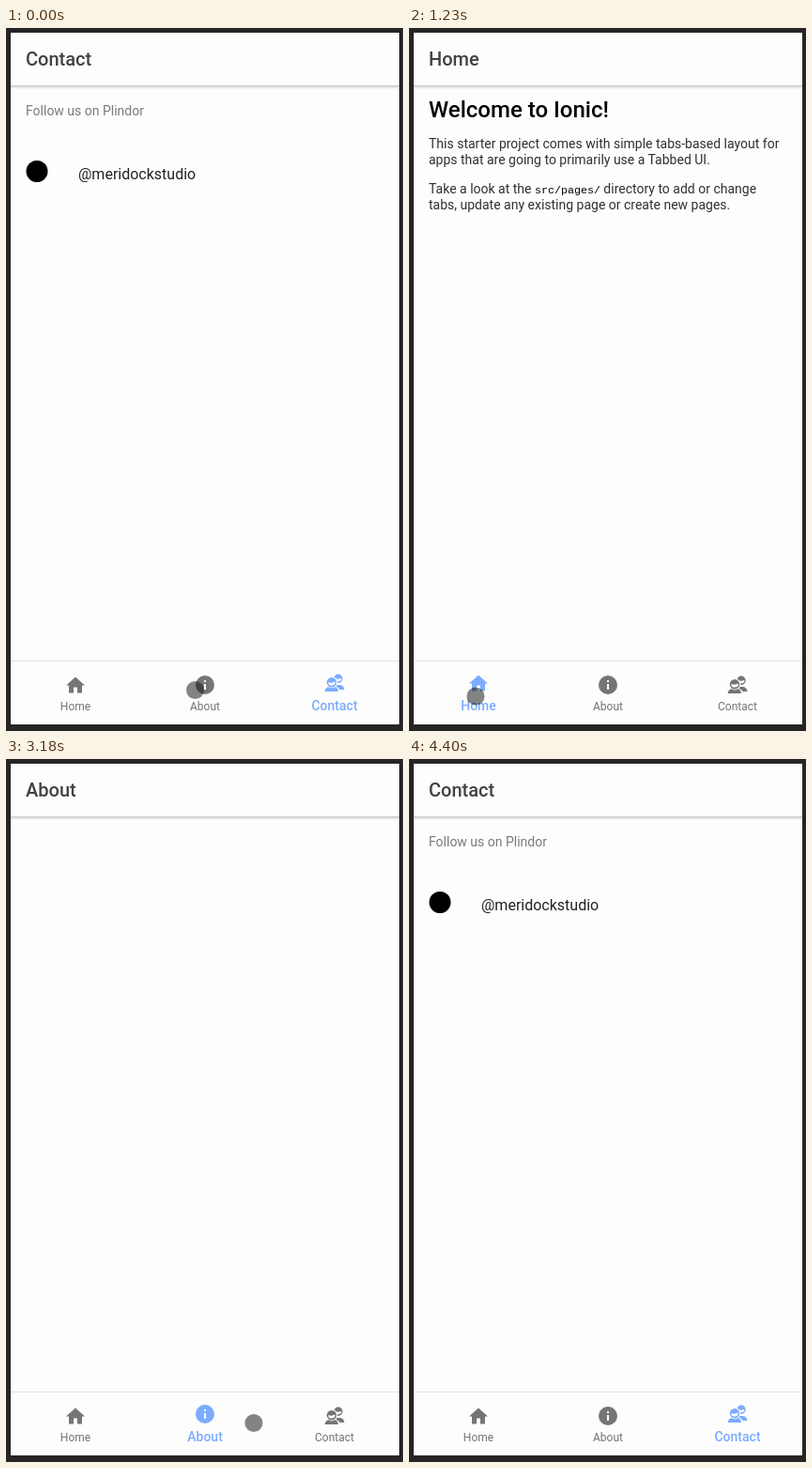
Write an HTML page that moves like this. It is 423 by 748 pixels and loops after 5230 ms.

```html
<!DOCTYPE html>
<html lang="en">
<head>
<meta charset="utf-8">
<title>Tabs starter</title>
<style>
html, body { margin: 0; width: 100%; height: 100%; overflow: hidden; background: #262425; }
svg { display: block; font-family: Roboto, sans-serif; font-size: 14px; }
.title { font-size: 20px; font-weight: 500; fill: #424242; }
.body { fill: #303030; }
.code { font: 11.67px "Liberation Mono", monospace; fill: #000; }
.tab { fill: #757575; text-anchor: middle; font-size: 12px; }
.tab.on { fill: #7cacff; }
.tab.big { font-size: 14px; font-weight: 500; }
.tab.big .icon { transform: translateY(-2px); }
.paper { fill: #fdfdfd; }
</style>
</head>
<body>
<svg width="423" height="748" viewBox="0 0 423 748">
  <defs>
    <linearGradient id="shade" x2="0" y2="1">
      <stop stop-color="#c6c6c6"/><stop offset="1" stop-color="#fdfdfd"/>
    </linearGradient>
    <g id="head">
      <circle class="paper" r="6.2"/>
      <circle r="5.2"/>
      <path class="paper" d="M-3.8-.2Q0 1.4 3.8-.6A3.8 3.8 0 0 1-3.8-.2Z"/>
    </g>
  </defs>
  <rect width="423" height="748" fill="#262425"/>
  <rect class="paper" x="5" y="5" width="414" height="736"/>
  <rect x="5" y="61" width="414" height="4" fill="url(#shade)"/>
  <rect x="5" y="673" width="414" height="1" fill="#e2e2e2"/>

  <g class="page">
    <text class="title" x="21" y="40">Home</text>
    <text x="21" y="95" font-size="24" font-weight="500">Welcome to Ionic!</text>
    <g class="body">
      <text x="21" y="128">This starter project comes with simple tabs-based layout for</text>
      <text x="21" y="145">apps that are going to primarily use a Tabbed UI.</text>
      <text x="21" y="176">Take a look at the <tspan class="code">src/pages/</tspan> directory to add or change</text>
      <text x="21" y="193">tabs, update any existing page or create new pages.</text>
    </g>
  </g>
  <g class="page">
    <text class="title" x="21" y="40">About</text>
  </g>
  <g class="page">
    <text class="title" x="21" y="40">Contact</text>
    <text x="21" y="93" fill="#7a7a7a">Follow us on Plindor</text>
    <circle cx="33" cy="152.5" r="11.5"/>
    <text x="77" y="161" font-size="16" fill="#222">@meridockstudio</text>
  </g>

  <g class="tab" transform="translate(74 699)">
    <path class="icon" d="M-2 8.5V2.5H2V8.5H7V.5H10L0-8.5-10 .5H-7V8.5Z"/>
    <text y="27">Home</text>
  </g>
  <g class="tab" transform="translate(212 699)">
    <g class="icon">
      <circle r="10"/>
      <path class="paper" d="M-1-5H1V-3H-1ZM-1-1H1V5H-1Z"/>
    </g>
    <text y="27">About</text>
  </g>
  <g class="tab" transform="translate(350 699)">
    <g class="icon">
      <path d="M2 2H6Q10 2.5 10.5 7H5.5Q5 5 2 4Z"/>
      <use href="#head" transform="translate(4 -4.8) scale(.9)"/>
      <path d="M-10.5 9Q-9.5 4.3-6 4H0Q3.5 4.3 4 9Z"/>
      <use href="#head" x="-3" y="-.8"/>
    </g>
    <text y="27">Contact</text>
  </g>
  <circle id="touch" r="9.5" fill="#141414" fill-opacity=".52"/>
</svg>
<script>
const LOOP = 5230, STEPS = 38, LAG = 22, HIDE = 32;
const pages = document.querySelectorAll('.page');
const tabs = document.querySelectorAll('.tab');
const touch = document.getElementById('touch');

// the screen is sampled in equal steps; all times below count them
const tabAt = k => k < 7 ? 2 : k < 19 ? 0 : k < 29 ? 1 : 2;

// glides of the finger: start, duration, end point, sag of the arc
const origin = { x: 201.5, y: 704.5 };
const glides = [
  { from: 0, dur: 4.5, x: 71, y: 711, sag: 19 },
  { from: 14, dur: 1.24, x: 208.5, y: 706, sag: 14 },
  { from: 22, dur: 2, x: 319.5, y: 707, sag: 0 },
  { from: 24, dur: 2.2, x: 353.5, y: 713, sag: 6 }
];

function touchAt(k) {
  let { x, y } = origin;
  for (const g of glides) {
    const u = Math.min(1, Math.max(0, (k - g.from) / g.dur));
    const e = u * u * (3 - 2 * u);
    x += (g.x - x) * e;
    y += (g.y - y) * e + g.sag * Math.sin(Math.PI * e);
  }
  return [x, y];
}

function draw(ms) {
  const k = Math.floor((ms + LAG) * STEPS / LOOP) % STEPS;
  const on = tabAt(k), big = tabAt(k - 1);   // a tab grows one step after its colour
  pages.forEach((p, i) => p.style.display = i === on ? '' : 'none');
  tabs.forEach((tab, i) => {
    tab.classList.toggle('on', i === on);
    tab.classList.toggle('big', i === big);
  });
  const [x, y] = touchAt(k);
  touch.setAttribute('cx', x);
  touch.setAttribute('cy', y);
  touch.style.display = k < HIDE ? '' : 'none';
}

const start = performance.now();
function tick() {
  draw(performance.now() - start);
  requestAnimationFrame(tick);
}
tick();
</script>
</body>
</html>
```
